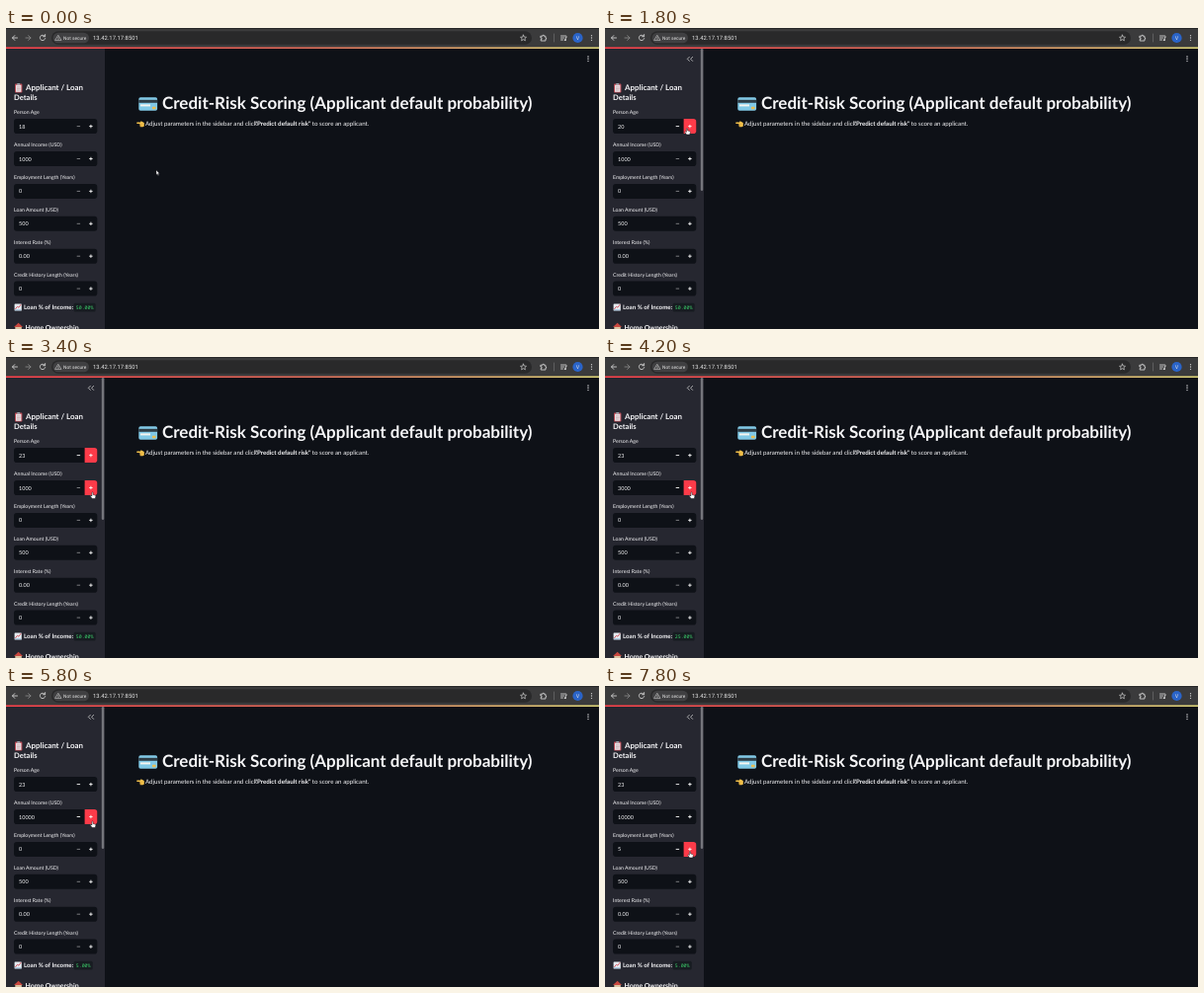
Animation of 600x305 px, one loop 8 s. Source, as an HTML page:

```html
<!DOCTYPE html>
<html lang="en">
<head>
<meta charset="utf-8">
<title>Credit-Risk Scoring</title>
<style>
  html, body { margin: 0; width: 100%; height: 100%; overflow: hidden; background: #0e1117; }
  svg { display: block; width: 100%; height: 100%; }
  text { font-family: Lato, sans-serif; fill: #f6f6f8; text-rendering: geometricPrecision; white-space: pre; }
  .bar text { font-family: Roboto, sans-serif; fill: #e6e6e6; }
  .line { fill: none; stroke: #d0d0d0; stroke-width: .9; stroke-linecap: round; stroke-linejoin: round; }
  .faint { stroke: #858585; }
  .label { font-size: 5.2px; }
  .value { font-size: 5.5px; }
  .body { font-size: 6.2px; }
  .bold { font-weight: 700; }
  .code { font: 4.9px "Noto Sans Mono", monospace; fill: #3dd56d; }
</style>
</head>
<body>
<svg viewBox="0 0 600 305" preserveAspectRatio="none">
  <defs>
    <linearGradient id="accent">
      <stop offset="0" stop-color="#f0434b"/>
      <stop offset=".5" stop-color="#d96a59"/>
      <stop offset="1" stop-color="#d6cf78"/>
    </linearGradient>
  </defs>
  <rect width="600" height="305" fill="#0e1117"/>

  <g class="bar">
    <rect width="600" height="19.5" fill="#3b3b3c"/>
    <rect width="600" height="1" fill="#242526"/>
    <path class="line" d="M11.5 10H6.5M8.8 7.6L6.5 10L8.8 12.4"/>
    <path class="line faint" d="M20 10H25M22.7 7.6L25 10L22.7 12.4"/>
    <path class="line" d="M39.2 8.2A2.7 2.7 0 1 0 39.7 10.6M39.6 6.6V8.7H37.5"/>
    <rect x="46" y="3.2" width="486" height="13.6" rx="6.8" fill="#29292a"/>
    <rect x="47.5" y="4.7" width="36.5" height="10.6" rx="5.3" fill="#404042"/>
    <path class="line" stroke-width=".6" d="M53 7.6L56 12.4H50ZM53 9.3V10.6M53 11.5V11.6" style="stroke-width:.6"/>
    <text x="58" y="11.8" font-size="4.8">Not secure</text>
    <text x="88" y="12.1" font-size="5.9">13.42.17.17:8501</text>
    <path class="line" style="stroke-width:.7" d="M523.5 7.1L524.4 9.1L526.5 9.3L524.9 10.7L525.4 12.8L523.5 11.7L521.6 12.8L522.1 10.7L520.5 9.3L522.6 9.1Z"/>
    <path class="line" d="M541.2 8.2H543V7.3H544.3V8.2H545.9V10H546.6V11.2H545.9V13H541.2V11.5H542V9.8H541.2Z"/>
    <path class="line faint" style="stroke-width:.5" d="M554.5 6V14"/>
    <path class="line" d="M561.5 8H566.5M561.5 10H564.5M561.5 12H563.5M566.3 12.3V9H567.5"/>
    <circle cx="565.7" cy="12.2" r=".9" fill="#d0d0d0"/>
    <circle cx="578.5" cy="10" r="5.1" fill="#2a64c9"/>
    <text x="578.5" y="11.9" font-size="5.3" text-anchor="middle">V</text>
    <g fill="#d0d0d0"><circle cx="592.5" cy="7.7" r=".65"/><circle cx="592.5" cy="10" r=".65"/><circle cx="592.5" cy="12.3" r=".65"/></g>
  </g>

  <rect y="19.5" width="100" height="285.5" fill="#262730"/>
  <rect y="19.3" width="600" height="1.7" fill="url(#accent)"/>

  <g fill="#f0f0f2"><circle cx="589" cy="29" r=".7"/><circle cx="589" cy="31.3" r=".7"/><circle cx="589" cy="33.6" r=".7"/></g>

  <!-- credit card -->
  <rect x="134.3" y="70.3" width="18.8" height="13.4" rx="1.8" fill="#81c9e6"/>
  <rect x="134.3" y="72.8" width="18.8" height="3" fill="#2e3c45"/>
  <rect x="136" y="77.4" width="10" height="2" fill="#f5f5f0"/>
  <rect x="148" y="79.8" width="3.6" height="2.4" rx=".6" fill="#e9bd52"/>
  <text class="bold" x="158" y="81.6" font-size="17.05">Credit-Risk Scoring (Applicant default probability)</text>

  <!-- pointing hand -->
  <path fill="#f3c24b" d="M132.5 95.6H136L136.6 94.2L138 95L139.8 96V99.4L138.6 100.2H135.8L135.2 97H132.5Q131.9 96.3 132.5 95.6Z"/>
  <path stroke="#b98225" stroke-width=".4" d="M135.6 98H137.6M135.7 99.1H137.5"/>
  <text class="body" x="141" y="99.3">Adjust parameters in the sidebar and click</text>
  <text class="body bold" x="251.5" y="99.3">"Predict default risk"</text>
  <text class="body" x="309.7" y="99.3">to score an applicant.</text>

  <!-- sidebar -->
  <g id="hover">
    <path class="line" style="stroke-width:.8" d="M85.3 29.4L83.3 31.4L85.3 33.4M88.6 29.4L86.6 31.4L88.6 33.4"/>
    <rect x="96.8" y="21" width="2.4" height="144" rx="1.2" fill="#74757b"/>
  </g>
  <rect x="9" y="56.6" width="7.4" height="9" rx=".8" fill="#b94a55"/>
  <rect x="10" y="57.8" width="5.4" height="7" fill="#eadfe2"/>
  <rect x="11.2" y="56" width="3" height="1.8" rx=".5" fill="#9aa4ad"/>
  <path stroke="#a98a92" stroke-width=".5" d="M11 59.8H14.5M11 61.4H14.5M11 63H14"/>
  <g class="bold">
    <text x="20" y="63.2" font-size="7.9">Applicant / Loan</text>
    <text x="8" y="72.8" font-size="7.6">Details</text>
  </g>
  <g id="fields"></g>

  <rect x="8.6" y="279.4" width="7.2" height="7" rx=".5" fill="#e6edf2"/>
  <path class="line" style="stroke:#d44a55" d="M9.6 284.6L11.6 282.2L12.8 283.2L15 280.4"/>
  <path stroke="#5b9bd5" stroke-width=".5" d="M9.2 285.7H15.2"/>
  <text class="body bold" x="18" y="285.2">Loan % of Income:</text>
  <rect id="chip" x="68.6" y="278.8" width="22" height="8.6" rx="1.5" fill="#171c21"/>
  <text id="share" class="code" x="70.8" y="284.8"></text>
  <path fill="#c9483f" d="M8 303L12.6 298.8L17 303Z"/>
  <path fill="#dcc2a0" d="M9.3 303H15.8V305H9.3Z"/>
  <text class="bold" x="19.5" y="305.5" font-size="6.9">Home Ownership</text>

  <g id="cursor">
    <path id="arrow" fill="#fff" stroke="#15161a" stroke-width=".4" d="M0 0V4.7L1.1 3.7L1.9 5.4L2.7 5L1.9 3.4H3.4Z"/>
    <path id="hand" fill="#fff" stroke="#15161a" stroke-width=".5" d="M-.6 -2.6Q0 -3.4 .6 -2.6V-.5L2.8 .1Q3.5 .5 3.3 1.4L2.7 3.5H-.4L-2.2 1.1Q-2.2 .2 -1.4 .4L-.6 1Z"/>
  </g>
</svg>
<script>
const LOOP = 8000, TICK = 200;
const byId = id => document.getElementById(id);

const names = ["Person Age", "Annual Income (USD)", "Employment Length (Years)",
  "Loan Amount (USD)", "Interest Rate (%)", "Credit History Length (Years)"];

const fields = names.map((name, i) => {
  const y = 99.6 + i * 32.9;
  const group = document.createElementNS("http://www.w3.org/2000/svg", "g");
  group.setAttribute("transform", `translate(0 ${y})`);
  group.innerHTML = `
    <text class="label" x="8" y="-12.3">${name}</text>
    <rect x="8" y="-7.5" width="84.3" height="15" rx="2.8" fill="#0e1117"/>
    <path class="hot" fill="#fc3b49" d="M79.6 -7.5H89.5Q92.3 -7.5 92.3 -4.7V4.7Q92.3 7.5 89.5 7.5H79.6Z"/>
    <text class="value" x="13" y="2"></text>
    <path class="minus" stroke="#fafafa" stroke-width=".9" d="M71.7 0H75.1"/>
    <path stroke="#fafafa" stroke-width=".9" d="M84.2 0H87.6M85.9 -1.7V1.7"/>`;
  byId("fields").append(group);
  const part = c => group.querySelector(c);
  return { value: part(".value"), minus: part(".minus"), hot: part(".hot") };
});

function setField(i, value, raised = false, hot = false) {
  fields[i].value.textContent = value;
  fields[i].minus.style.opacity = raised ? 1 : .5;
  fields[i].hot.style.display = hot ? "" : "none";
}

// Pointer stops: time, x, y
const stops = [[0, 152, 144], [200, 152, 144], [800, 77, 118], [1000, 69, 114.5], [1400, 83, 104.5],
  [2600, 83, 104.5], [3200, 87.5, 140], [5800, 87.5, 140], [6400, 86, 170.5], [LOOP, 86, 170.5]];

function pointerAt(t) {
  const n = stops.findIndex(s => s[0] > t);
  const [t0, x0, y0] = stops[n - 1], [t1, x1, y1] = stops[n];
  const k = (t - t0) / (t1 - t0);
  return [x0 + (x1 - x0) * k, y0 + (y1 - y0) * k];
}

const clicks = (t, start, max) => Math.max(0, Math.min(max, Math.floor((t - start) / TICK) + 1));
const incomeAt = t => 1000 * (1 + clicks(t, 4000, 9));

function draw(now) {
  const t = Math.floor(now % LOOP / TICK) * TICK;
  const age = 18 + clicks(t, 1600, 5);
  const income = incomeAt(t);
  const years = clicks(t, 7000, 5);
  setField(0, age, age > 18, t >= 1400 && t < 4000);
  setField(1, income, income > 1000, t >= 3200 && t < 6600);
  setField(2, years, years > 0, t >= 6400);

  // The share is recomputed one tick after the income changes.
  const share = (50000 / incomeAt(t - TICK)).toFixed(2) + "%";
  byId("share").textContent = share;
  byId("chip").setAttribute("width", 4.4 + share.length * 2.94);

  const [x, y] = pointerAt(t);
  const pointing = t >= 1400;
  byId("cursor").setAttribute("transform", `translate(${x} ${y})`);
  byId("arrow").style.display = pointing ? "none" : "";
  byId("hand").style.display = pointing ? "" : "none";
  byId("hover").style.display = x < 100 ? "" : "none";
}

setField(3, "500");
setField(4, "0.00");
setField(5, "0");

const start = performance.now();
function frame() {
  draw(performance.now() - start);
  requestAnimationFrame(frame);
}
frame();
</script>
</body>
</html>
```
